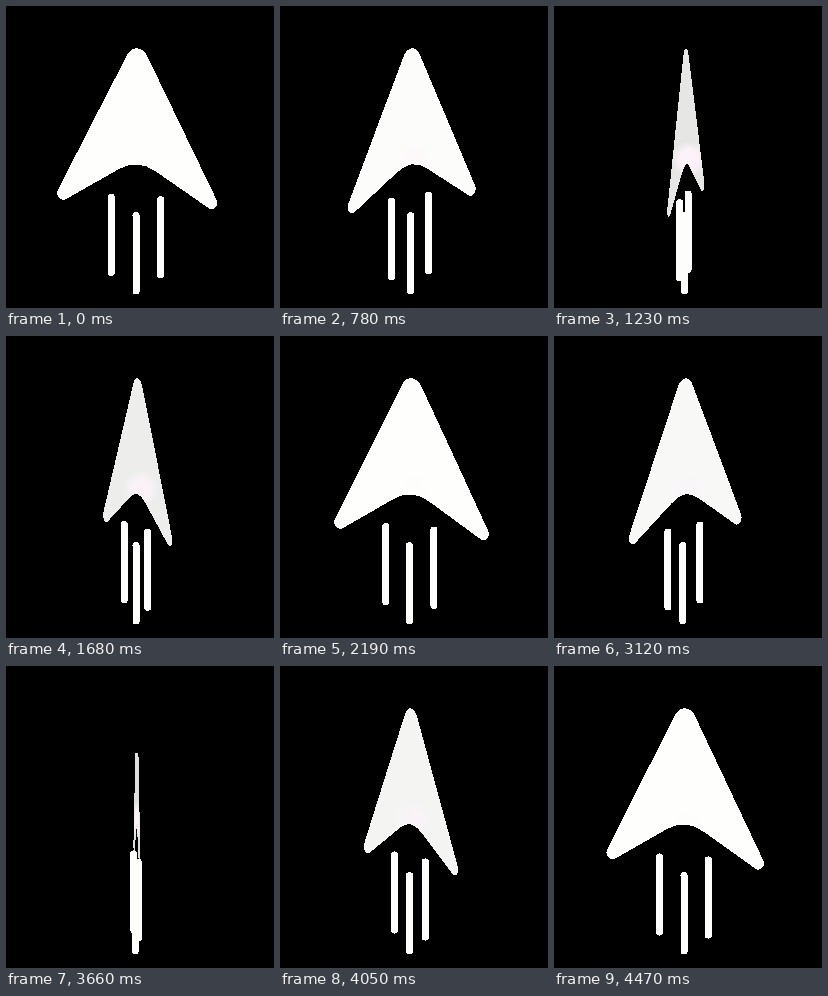
These frames come from a looping animation (268 by 302 pixels, 4500 ms). An HTML page with a canvas:

```html
<!DOCTYPE html>
<html lang="en">
<head>
<meta charset="utf-8">
<title>Spinning arrow</title>
<style>
  html, body { margin: 0; width: 100%; height: 100%; overflow: hidden; background: #000; }
  canvas { display: block; width: 268px; height: 302px; filter: url(#crisp); }
  svg { position: absolute; }
</style>
</head>
<body>
<svg width="0" height="0">
  <filter id="crisp" x="0" y="0" width="1" height="1" color-interpolation-filters="sRGB">
    <feComponentTransfer><feFuncA type="discrete" tableValues="0 1"/></feComponentTransfer>
  </filter>
</svg>
<canvas id="stage" width="268" height="302"></canvas>
<script>
const W = 268, H = 302, LOOP = 4500, STEP = 30;
const START = -20.7, BAR_LEAD = 3.1;   // degrees
const TILT = 0.166;                    // vertical shift per unit of depth
const ctx = document.getElementById('stage').getContext('2d');

const turn = degrees => {
  const a = degrees * Math.PI / 180;
  return [Math.cos(a), Math.sin(a)];
};

function arrowPath() {
  ctx.beginPath();
  ctx.moveTo(-40, 105);
  ctx.arcTo(0, 30.3, 94.5, 208, 11);
  ctx.arcTo(94.5, 208, 20, 164, 6);
  ctx.lineTo(20, 164);
  ctx.quadraticCurveTo(0, 152, -20, 164);
  ctx.arcTo(-94.5, 208, -40, 105, 6);
  ctx.closePath();
}

function drawArrow(cos, sin) {
  const face = Math.abs(cos);
  const cx = 131.4 + 0.4 * sin;
  const level = Math.round(Math.min(254, 221 + 41 * face));
  const shine = Math.min(1, 1.5 * (1 - face));
  const glow = ctx.createRadialGradient(cx + 3, 153, 9, cx + 3, 153, 18);
  glow.addColorStop(0, `rgba(252, 242, 249, ${shine})`);
  glow.addColorStop(1, 'rgba(252, 242, 249, 0)');

  ctx.save();
  // the tip vanishes when the plate is seen edge-on
  const top = 42 + Math.min(H, 0.06 / (cos * cos + 1e-6));
  ctx.beginPath();
  ctx.rect(0, top, W, H);
  ctx.clip();
  ctx.transform(cos, -sin * TILT, 0, 1, cx, 0);
  arrowPath();
  ctx.setTransform(1, 0, 0, 1, 0, 0);
  ctx.fillStyle = ctx.strokeStyle = `rgb(${level}, ${level + 1}, ${level - 1})`;
  ctx.lineWidth = 0.8;
  ctx.lineJoin = 'round';
  ctx.fill();
  ctx.stroke();
  ctx.fillStyle = glow;
  ctx.fill();
  ctx.restore();
}

function drawBar(x, y) {
  ctx.beginPath();
  ctx.roundRect(x - 3.5, y, 7, 82, 3);
  ctx.fillStyle = '#fdfefc';
  ctx.fill();
}

function draw(time) {
  const angle = START + 360 * time / LOOP;
  const [cos, sin] = turn(angle);
  const [barCos, barSin] = turn(angle + BAR_LEAD);
  ctx.clearRect(0, 0, W, H);
  drawArrow(cos, sin);
  for (const offset of [-26, 26]) {
    drawBar(129.9 + offset * barCos, 189 - offset * barSin * TILT);
  }
  drawBar(129.7 + 0.6 * (cos + sin), 206.3);
}

const begin = performance.now();
function tick() {
  const time = (performance.now() - begin) % LOOP;
  draw(Math.floor(time / STEP) * STEP);
  requestAnimationFrame(tick);
}
tick();
</script>
</body>
</html>
```
